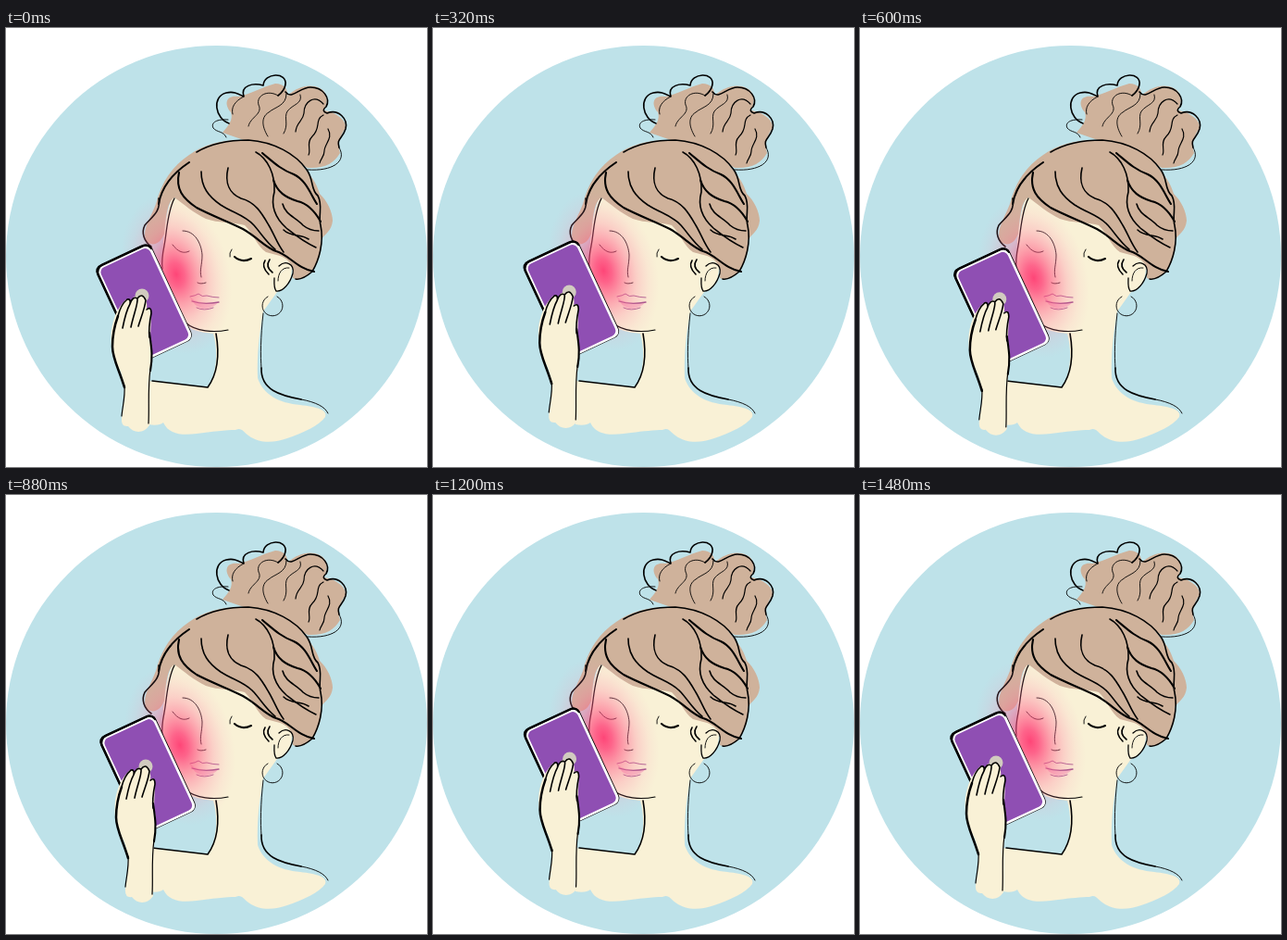
Write an HTML page that moves like this. It is 455 px wide and 474 px high and loops after 1600 ms.

```html
<!DOCTYPE html>
<html lang="en">
<head>
<meta charset="utf-8">
<title>Warm cheek</title>
<style>
  html, body { margin: 0; width: 100%; height: 100%; overflow: hidden; background: #fff; }
  svg { display: block; width: 455px; height: 474px; }
  .ink { fill: none; stroke: #000; stroke-width: 1.6; stroke-linecap: round; stroke-linejoin: round; }
  .thin { stroke-width: .9; }
  .bold { stroke-width: 2.1; }
  .skin { fill: #f9f1d6; }
  .hair { fill: #cfb29b; }
</style>
</head>
<body>
<svg viewBox="0 0 455 474">
  <defs>
    <radialGradient id="heat">
      <stop offset="0" stop-color="#ff2a68" stop-opacity=".86"/>
      <stop offset=".15" stop-color="#ff3a74" stop-opacity=".77"/>
      <stop offset=".35" stop-color="#ff5583" stop-opacity=".54"/>
      <stop offset=".6" stop-color="#ff7aa0" stop-opacity=".28"/>
      <stop offset=".82" stop-color="#ff92b4" stop-opacity=".1"/>
      <stop offset="1" stop-color="#ff9cc0" stop-opacity="0"/>
    </radialGradient>
  </defs>

  <circle cx="227.5" cy="246.5" r="227.5" fill="#bee2e9"/>

  <!-- body and face -->
  <path class="skin" d="M180 183C170 205 167 245 172 275C180 300 188 317 201 325C210 329 218 329 224 330C230 352 227 375 218 388L154 381V428Q165 430 170 426C176 439 190 440 206 438C222 436 238 434 248 434C255 431 256 436 262 440C274 449 290 448 304 443C321 437 339 429 345 420C348 412 335 409 318 407C295 405 278 396 272 378C271 350 274 330 278 306L293 285C306 281 311 266 308 252L270 205L225 190Z"/>

  <!-- hair -->
  <path class="hair" d="M162 190C168 166 180 149 198 137C214 125 236 120 258 121C290 122 311 135 323 152C333 163 337 172 339 179C347 186 353 199 353 208C352 219 345 222 340 229C343 246 333 262 325 268C319 272 314 272 310 270C312 255 304 249 296 246L281 242C271 235 268 223 258 213C244 209 230 211 216 206C203 200 192 190 182 183C174 187 173 205 171 222C168 231 160 237 152 231C146 219 156 206 162 190Z"/>
  <path class="hair" d="M234 113C240 106 246 99 243 91C235 82 238 72 251 74C263 72 276 64 291 60C300 60 305 66 304 73C316 63 328 60 339 65C348 69 349 80 343 89C354 90 368 98 367 108C361 116 358 125 361 135C355 146 344 152 326 151L310 142L260 122Z"/>

  <g class="ink">
    <path d="M241 103C226 98 222 74 238 70C246 68 251 71 257 74C253 62 267 59 278 62C279 48 304 47 302 61C301 67 298 70 294 73"/>
    <path d="M302 69C309 78 317 64 329 64C343 64 351 76 346 85C341 89 344 91 347 92C359 87 370 98 367 109C363 121 357 119 360 129"/>
    <path class="thin" d="M360 129C369 144 353 155 326 153M240 99C228 98 221 102 224 108C228 113 235 111 238 118"/>
    <path class="thin" d="M257 74C247 79 243 86 245 93M294 73C283 66 270 73 273 83C278 93 264 96 262 106M303 71C303 84 291 85 284 91C274 97 278 109 283 117M318 72C321 82 310 82 304 90C300 97 306 104 300 114"/>
    <path d="M343 82C333 71 322 80 322 92C321 101 314 101 313 112M343 94C333 99 341 108 331 117C324 124 330 132 327 137M348 109C354 119 344 125 344 133C344 139 340 141 339 146" stroke-width="1.2"/>

    <path class="bold" d="M165 190C168 172 180 157 198 145"/>
    <path d="M206 134C223 124 243 121 262 121C290 123 313 136 325 153C333 164 329 175 337 181C343 192 337 202 340 213C344 232 338 251 331 263C324 269 318 272 313 271"/>
    <path class="bold" d="M187 156C183 174 191 184 206 194C221 202 240 209 256 217C272 226 280 237 292 241C306 245 315 260 333 263"/>
    <path d="M240 151C236 168 242 179 254 184C270 188 277 201 284 213C290 223 293 233 300 242M211 155C211 172 219 182 232 191C246 200 258 202 268 213C276 222 281 231 291 239M270 134C283 141 291 158 290 177C285 195 293 207 303 216C313 224 320 230 335 237"/>
    <path class="bold" d="M277 135C288 144 297 153 311 158C324 164 329 179 336 190M289 164C293 177 302 183 315 187C328 190 335 200 340 209"/>
    <path d="M299 190C302 202 313 204 321 213C327 218 332 219 338 219M300 218C308 226 319 222 327 228"/>
    <path d="M165 184C168 199 156 205 150 213C146 221 149 230 157 236"/>
    <path d="M182 184C174 199 174 220 171 235C169 245 168 252 169 260" stroke-width="1.3"/>

    <path class="thin" d="M191 219C204 219 211 232 212 245C212 256 209 261 211 269M207 275Q210 277 216 275M180 234C186 242 192 244 198 241"/>
    <path class="thin" d="M244 239Q241 243 242 247"/>
    <path class="bold" d="M247 247Q255 254 265 249"/>
    <path d="M194 318C205 328 225 329 240 326" stroke-width="1.2"/>

    <path d="M295 257C302 250 312 255 310 265C307 276 299 285 292 284C289 280 290 274 290 270" stroke-width="1.3"/>
    <path class="thin" d="M306 259C298 258 294 265 294 273"/>
    <path d="M280 251C276 257 281 263 284 266M285 250C281 256 284 261 288 264"/>
    <path class="thin" d="M283 290A11 11 0 1 0 293 290"/>

    <path d="M227 330C231 353 228 374 218 388L158 381"/>
    <path class="thin" d="M278 308C275 334 275 354 276 368"/>
    <path d="M276 367C275 391 297 397 319 401"/>
    <path class="thin" d="M319 401C335 404 345 409 348 416"/>
  </g>
  <path d="M199 291Q208 299 230 296Q222 304 212 303Q203 300 199 291Z" fill="#f19bb8" fill-opacity=".6"/>
  <g class="ink thin" style="stroke: #9c4f88">
    <path d="M199 290Q205 289 208 287Q212 291 217 289Q224 291 230 291M206 302Q214 306 224 302"/>
    <path d="M201 295Q213 299 230 296" stroke-width="1.3"/>
  </g>

  <!-- moving hand, phone and warmth -->
  <g id="pat">
    <ellipse cx="184" cy="266" rx="58" ry="88" transform="rotate(-14 184 266)" fill="url(#heat)"/>
    <g transform="translate(149.3 297) rotate(-25)">
      <rect x="-33" y="-57.5" width="66" height="115" rx="8"/>
      <rect x="-30.8" y="-55.3" width="63" height="112.2" rx="7" fill="#fff"/>
      <rect x="-29" y="-53.5" width="58.5" height="108" rx="6" fill="#8f4fb3"/>
      <path class="ink bold" d="M-32.3 20V-49Q-32.3 -56.8 -24 -56.8H23Q31 -56.8 32 -50"/>
    </g>
    <circle cx="147" cy="289" r="7.5" fill="#d1cbbf"/>
    <path class="skin" d="M125 421C128 404 130 389 124 371C117 357 112 347 114 326C116 313 120 304 127 296Q131 290 135 295Q138 288 142 291Q146 285 150 292Q153 296 152 303Q157 300 157 309L156 333C160 350 157 367 155 382V429C149 438 138 438 132 430Q124 431 125 421Z"/>
    <g class="ink">
      <path d="M128 388C122 368 115 357 115 344C115 333 117 322 121 311" stroke-width="2.5"/>
      <path d="M121 311C123 303 126 297 131 293Q135 292 134 298C130 305 128 314 126 324M134 298Q137 289 142 292C143 297 138 309 135 323M142 292Q147 285 151 294C150 303 146 312 143 322M152 304Q157 300 157 308C155 318 154 326 155 334"/>
      <path class="bold" d="M155 329C157 344 159 354 156 370"/>
      <path d="M128 386C129 398 126 408 125 419M156 368C153 390 155 408 154 427" stroke-width="1.2"/>
    </g>
  </g>
</svg>
<script>
  const LOOP = 1600, STEP = 40;
  const pat = document.getElementById('pat');
  // time, x, y on the way out; the way back mirrors it
  const path = [
    [80, 0, 0], [200, 0, -1.5], [345, .3, -4.5],
    [440, 2, -.9], [600, 3.8, 3.8], [720, 4.1, 4.2]
  ];

  function offset(time) {
    const t = Math.min(720, Math.max(80, time < 780 ? time : 1560 - time));
    const i = Math.max(1, path.findIndex(key => key[0] >= t));
    const [t0, x0, y0] = path[i - 1], [t1, x1, y1] = path[i];
    const k = (t - t0) / (t1 - t0);
    return [x0 + (x1 - x0) * k, y0 + (y1 - y0) * k];
  }

  function draw() {
    const time = Math.floor(performance.now() % LOOP / STEP) * STEP;
    pat.setAttribute('transform', `translate(${offset(time)})`);
    requestAnimationFrame(draw);
  }
  draw();
</script>
</body>
</html>
```
